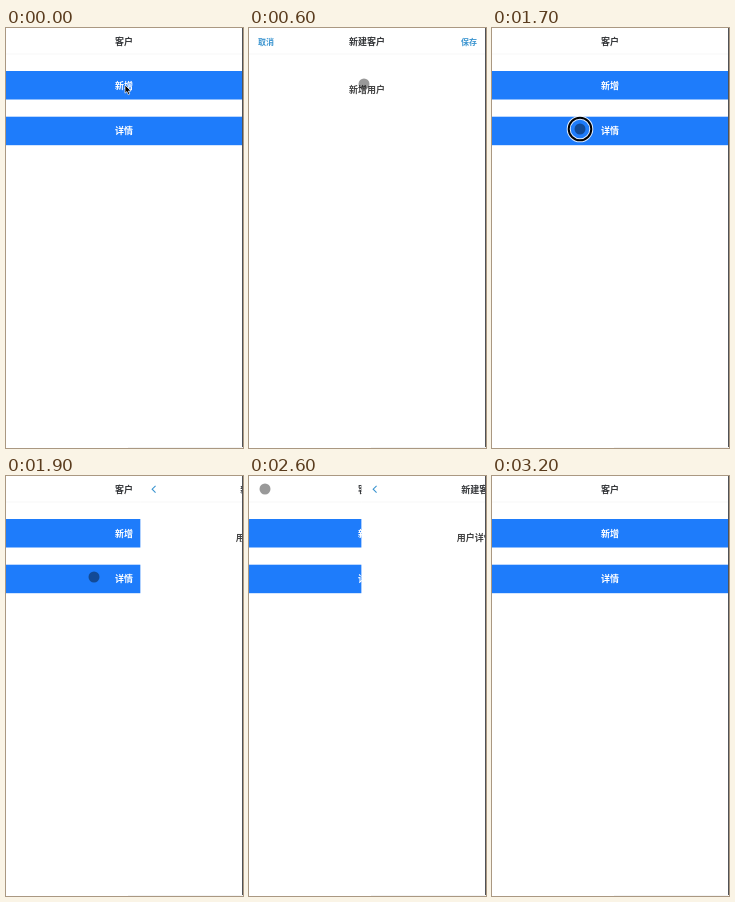
An HTML page for the animation above (3300 ms loop, 237 px wide and 420 px high).

```html
<!DOCTYPE html>
<html lang="zh-CN">
<head>
<meta charset="utf-8">
<style>
  html, body { margin: 0; width: 100%; height: 100%; overflow: hidden; background: #fff; }
  svg { display: block; width: 100vw; height: 100vh; }
  text { font: 700 9px "Noto Sans CJK SC", "Noto Sans CJK", sans-serif; fill: #444; text-anchor: middle; }
  .title { fill: #36383b; }
  .button { fill: #fff; }
  .link { font-size: 8px; fill: #3c95d0; }
  .page { fill: #fff; }
  .rule { fill: #f8f8f8; }
  .blue { fill: #1e7cfb; }
</style>
</head>
<body>
<svg viewBox="0 0 237 420">
  <g id="home">
    <rect class="page" width="237" height="420"/>
    <rect class="rule" y="25.5" width="237" height="1"/>
    <text class="title" x="118" y="16.5">客户</text>
    <rect class="blue" y="43" width="237" height="28.5"/>
    <text class="button" x="118" y="60.8">新增</text>
    <rect class="blue" y="88.7" width="237" height="28.5"/>
    <text class="button" x="118" y="106.4">详情</text>
  </g>
  <g id="create">
    <rect class="page" width="237" height="420"/>
    <rect class="rule" y="25.5" width="237" height="1"/>
    <text class="link" x="17" y="16.5">取消</text>
    <text class="title" x="118" y="16.5">新建客户</text>
    <text class="link" x="220" y="16.5">保存</text>
    <text x="118" y="64.9">新增用户</text>
  </g>
  <g id="detail">
    <rect class="page" width="237" height="420"/>
    <rect class="rule" y="25.5" width="237" height="1"/>
    <path d="M15.2 9.8L11.8 13.2L15.2 16.6" fill="none" stroke="#3c95d0" stroke-width="1.1"/>
    <text class="title" x="118" y="16.5">新建客户</text>
    <text x="118" y="64.9">用户详情页</text>
  </g>
  <rect x="236" width="1" height="420" fill="#505256"/>
  <rect x="122" y="419" width="115" height="1" fill="#f4f4f4"/>
  <g id="touch">
    <g id="ring" fill="none">
      <circle r="11.3" stroke="#fff" stroke-opacity=".85" stroke-width="4"/>
      <circle r="11.3" stroke="#000" stroke-width="2"/>
    </g>
    <circle r="5.5" fill="#000" fill-opacity=".4"/>
  </g>
  <path id="arrow" d="M119 57V65.2L120.9 63.5L122.3 66.7L123.8 66L122.4 63H125Z" fill="#000" stroke="#fff" stroke-width=".7"/>
</svg>
<script>
const LOOP = 3300, STEP = 100, WIDTH = 237, HEIGHT = 420;
const $ = id => document.getElementById(id);

const taps = [400, 1000, 1700, 2400];
const moves = [
  { at: 100, time: 100, x: 115, y: 56 },
  { at: 600, time: 300, x: 16, y: 13 },
  { at: 1500, time: 200, x: 88, y: 101 },
  { at: 2000, time: 244, x: 16, y: 13 },
  { at: 2800, time: 300, x: 100, y: 363 }
];

const progress = (t, at, time) => Math.min(1, Math.max(0, (t - at) / time));
const easeOut = (p, power) => 1 - (1 - p) ** power;
const smooth = p => p * p * (3 - 2 * p);

// Share of the stage a page is pushed away: 1 hidden, 0 in place
const away = (t, enter, enterTime, leave, leaveTime) =>
  1 - easeOut(progress(t, enter, enterTime), 1.4) + smooth(progress(t, leave, leaveTime));

// Each move bends: y settles sooner than x
function touchAt(t) {
  let x = 119, y = 58;
  for (const m of moves) {
    const p = progress(t, m.at, m.time);
    x += (m.x - x) * p;
    y += (m.y - y) * easeOut(p, 2);
  }
  return [x, y];
}

const place = (id, x, y) => $(id).setAttribute("transform", `translate(${x} ${y})`);
const show = (id, on) => $(id).setAttribute("visibility", on ? "inherit" : "hidden");

let start;
function draw(now) {
  start ??= now;
  const t = Math.floor(((now - start) % LOOP) / STEP) * STEP;
  place("create", 0, HEIGHT * away(t, 400, 200, 1131, 370));
  place("detail", WIDTH * away(t, 1800, 300, 2460, 290), 0);
  place("touch", ...touchAt(t));
  show("arrow", t < 100);
  show("touch", t >= 100 && t < 3200);
  show("ring", taps.some(tap => t >= tap && t < tap + 200));
  requestAnimationFrame(draw);
}
requestAnimationFrame(draw);
</script>
</body>
</html>
```
